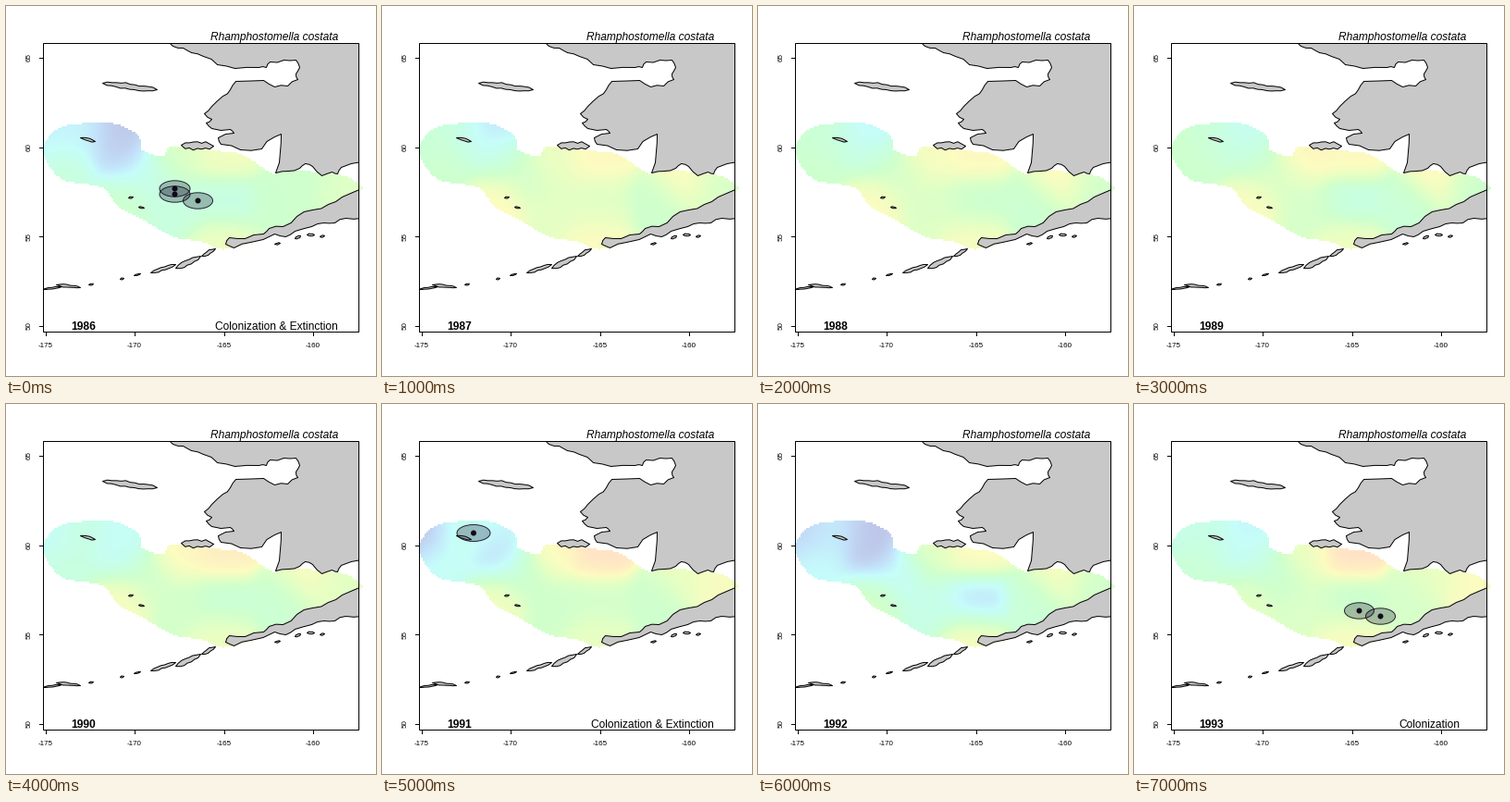
A matplotlib script for the animation above (8 s loop, 400 by 400 pixels).

```python
import numpy as np
import matplotlib.pyplot as plt
from matplotlib.animation import FuncAnimation
from matplotlib.patches import Ellipse, Polygon, Rectangle
from matplotlib.path import Path

plt.rcParams["font.family"] = "Liberation Sans"
PX = 0.72  # points per pixel at 100 dpi
LEFT, TOP, RIGHT, BOTTOM = 39.5, 39.5, 380.5, 351.5
rng = np.random.default_rng(5)

# Coast corners in stage pixels; roughen() adds the small bends.
MAINLAND = [
    (176, 38), (180, 43), (191, 45), (200, 50), (213, 54), (228, 63),
    (247, 67), (273, 66), (281, 66), (285, 60), (300, 58), (313, 58),
    (317, 66), (313, 73), (315, 79), (304, 86), (290, 87), (278, 80),
    (248, 81), (242, 90), (234, 97), (222, 108), (214, 116), (222, 122),
    (216, 126), (222, 132), (242, 133), (246, 137), (229, 142), (232, 149),
    (253, 155), (276, 154), (290, 141), (297, 138), (296, 157), (291, 180),
    (305, 178), (317, 175), (323, 170), (331, 173), (341, 183), (352, 179),
    (358, 181), (362, 174), (384, 168), (384, 36)]
PENINSULA = [
    (384, 197), (363, 206), (348, 214), (331, 220), (314, 227), (299, 238),
    (284, 240), (278, 246), (258, 251), (241, 250), (237, 257), (246, 261),
    (264, 255), (290, 246), (302, 249), (312, 243), (330, 238), (343, 234),
    (355, 234), (367, 229), (384, 229)]
# Islands: both tips and the greatest width.
ISLANDS = [
    (104, 83, 163, 90, 6), (189, 150, 224, 151, 9), (80, 142, 96, 146, 3),
    (132, 207, 137, 206, 2), (143, 217, 149, 218, 2),
    (183, 283, 210, 270, 6), (156, 288, 183, 279, 4),
    (211, 270, 226, 262, 4), (39, 306, 60, 303, 2), (54, 301, 80, 304, 3),
    (89, 301, 94, 300, 2), (123, 295, 127, 294, 2), (138, 291, 145, 289, 2),
    (290, 257, 296, 256, 2), (312, 251, 318, 248, 3),
    (325, 247, 333, 247, 3), (339, 249, 344, 248, 2)]
SURVEY = [
    (40, 153), (45, 170), (62, 188), (96, 194), (108, 199), (122, 217),
    (148, 231), (180, 249), (212, 255), (235, 263), (272, 252), (376, 206),
    (378, 190), (352, 181), (300, 178), (288, 181), (256, 161), (232, 157),
    (180, 152), (170, 163), (147, 155), (143, 140), (117, 127), (82, 127),
    (55, 133)]


def roughen(points, amount=0.13):
    corners = np.array(points, float)
    edge = np.roll(corners, -1, axis=0) - corners
    normal = np.column_stack([-edge[:, 1], edge[:, 0]])
    shift = rng.uniform(-amount, amount, (len(corners), 1)) * normal
    middle = corners + edge / 2 + np.clip(shift, -1.5, 1.5)
    return np.stack([corners, middle], axis=1).reshape(-1, 2)


def smooth(points, steps=8):
    """Closed Catmull-Rom curve through the points."""
    b = np.array(points, float)
    a, c, d = (np.roll(b, k, axis=0) for k in (1, -1, -2))
    curve = [b + t / 2 * (c - a + t * (2 * a - 5 * b + 4 * c - d
                                       + t * (3 * (b - c) + d - a)))
             for t in np.arange(steps) / steps]
    return np.stack(curve, axis=1).reshape(-1, 2)


def island(x0, y0, x1, y1, width):
    start, span = np.array([x0, y0]), np.array([x1 - x0, y1 - y0])
    length = np.hypot(*span)
    t = np.linspace(0, 1, 4 + int(length // 6))
    normal = np.array([-span[1], span[0]]) / length
    bulge = width / 2 * np.sqrt(4 * t * (1 - t))

    def side(sign):
        offset = sign * bulge * rng.uniform(0.55, 1.25, len(t))
        return start + t[:, None] * span + offset[:, None] * normal

    return np.vstack([side(1), side(-1)[-2:0:-1]])


# Temperature level at each station, 0 cold to 8 warm.
STATIONS = np.array([
    (50, 140), (85, 140), (118, 138), (65, 175), (125, 165), (125, 208),
    (155, 185), (185, 163), (235, 163), (190, 215), (235, 212), (232, 252),
    (325, 184), (300, 212), (360, 195)])
LEVELS = {
    1986: [1.6, 1.7, 0, 3.2, .5, 4, 2.6, 4.7, 5.6, 3.1, 2.7, 5.5, 4, 4, 4.8],
    1987: [3.5, 3, 1, 4, 3.2, 6.2, 4.3, 5.4, 6.2, 5, 4.8, 6, 6.2, 4, 4.5],
    1989: [4, 3.4, 2.1, 4, 3.5, 6, 4.5, 6.3, 6.2, 4.4, 2.8, 5.6, 6.5, 3.5, 4],
    1991: [0, 2.8, 2, 2.2, .7, 5.7, 3.7, 6.2, 7.4, 4.1, 4.2, 5.2, 5.4, 4, 5.8],
    1992: [.6, 1.5, 0, 2, 0, 4.5, 2, 5, 6.1, 2.8, 1, 5.8, 6, 3.5, 4.2],
    1993: [2.7, 3, 1.6, 3.6, 2.4, 5, 3.7, 5.5, 7.5, 4.6, 3.7, 5.9, 5.2, 4.4, 6]}
LEVELS = {year: np.array(v, float) for year, v in LEVELS.items()}
for gap in (1988, 1990):
    LEVELS[gap] = (LEVELS[gap - 1] + LEVELS[gap + 1]) / 2
RAMP = np.array([
    (190, 197, 232), (195, 226, 250), (198, 253, 250), (200, 255, 226),
    (206, 255, 206), (228, 255, 196), (252, 252, 192), (255, 234, 196),
    (255, 217, 202)]) / 255

side = np.arange(400) // 2 * 2 + 1.0  # two-pixel cells
cols, rows = np.meshgrid(side, side)
cells = np.column_stack([cols.ravel(), rows.ravel()])
inside = Path(smooth(SURVEY)).contains_points(cells)
dist2 = ((cells[inside, None] - STATIONS) ** 2).sum(axis=2)
weight = np.exp(-dist2 / (2 * 18 ** 2)) + 1e-9
weight /= weight.sum(axis=1, keepdims=True)


def field(year):
    level = weight @ LEVELS[year]
    image = np.zeros((400 * 400, 4))
    for c in range(3):
        image[inside, c] = np.interp(level, np.arange(len(RAMP)), RAMP[:, c])
    image[inside, 3] = 1
    return image.reshape(400, 400, 4)


YEARS = range(1986, 1994)
FIELDS = [field(year) for year in YEARS]

# Sites: centre and radii of each zone.
SITES = {
    1986: [(182.5, 197.5, 16.5, 8.7), (182.5, 203.5, 16.5, 8.7),
           (207.5, 210.5, 16, 8.7)],
    1991: [(99, 139.5, 18, 9)],
    1993: [(243.5, 223.5, 16, 8.7), (266.5, 229.5, 16, 8.7)]}
EVENTS = {1986: (226, "Colonization & Extinction"),
          1991: (226, "Colonization & Extinction"),
          1993: (286, "Colonization")}

fig = plt.figure(figsize=(4, 4), dpi=100, facecolor="white")
ax = fig.add_axes([0, 0, 1, 1])
ax.axis("off")
frame = Rectangle((LEFT, TOP), RIGHT - LEFT, BOTTOM - TOP, fill=False,
                  lw=PX, ec="black", zorder=6)
ax.add_patch(frame)


def label(x, y, s, size=12, **kw):
    return ax.text(x, y, s, fontsize=size * PX, zorder=7, **kw)


def line(xs, ys):
    ax.plot(xs, ys, color="black", lw=PX, zorder=6)


def draw_axes():
    for i, lon in enumerate(range(-175, -159, 5)):
        x = 42.5 + 96.5 * i
        line([x, x], [BOTTOM, BOTTOM + 4])
        label(x, 369, str(lon), 8, ha="center")
    for i, lat in enumerate(range(65, 49, -5)):
        y = 56 + 96.5 * i
        line([LEFT, LEFT - 4], [y, y])
        label(25, y, str(lat), 8, rotation=90, ha="center", va="center")


def draw_land():
    shapes = [roughen(MAINLAND), roughen(PENINSULA)]
    shapes += [island(*spec) for spec in ISLANDS]
    for shape in shapes:
        land = Polygon(shape + 0.5, fc="#c8c8c8", ec="black", lw=PX,
                       joinstyle="round", zorder=3)
        ax.add_patch(land)
        land.set_clip_path(frame)


def make_site(x, y, rx, ry):
    zone = Ellipse((x, y), 2 * rx, 2 * ry, fc=(0.08, 0.05, 0.18, 0.27),
                   ec=(0.06, 0.02, 0.1, 0.85), lw=PX, zorder=4)
    dot = Ellipse((x, y), 6, 6, fc="#12061c", ec="none", zorder=5)
    return [ax.add_patch(zone), ax.add_patch(dot)]


sea = ax.imshow(FIELDS[0], extent=(0, 400, 400, 0), interpolation="nearest",
                zorder=1)
ax.set_xlim(0, 400)
ax.set_ylim(400, 0)
ax.set_aspect("auto")
draw_axes()
draw_land()
label(221, 37, "Rhamphostomella costata", style="italic")
year_text = label(70.5, 350, "", weight="bold")
event_text = label(226, 350, "")
sites = {year: [p for spot in spots for p in make_site(*spot)]
         for year, spots in SITES.items()}


def update(i):
    year = YEARS[i]
    sea.set_data(FIELDS[i])
    year_text.set_text(str(year))
    x, words = EVENTS.get(year, (226, ""))
    event_text.set_x(x)
    event_text.set_text(words)
    for when, patches in sites.items():
        for patch in patches:
            patch.set_visible(when == year)
    return []


anim = FuncAnimation(fig, update, frames=len(YEARS), interval=1000,
                     repeat=True, repeat_delay=0)
plt.show()
```
